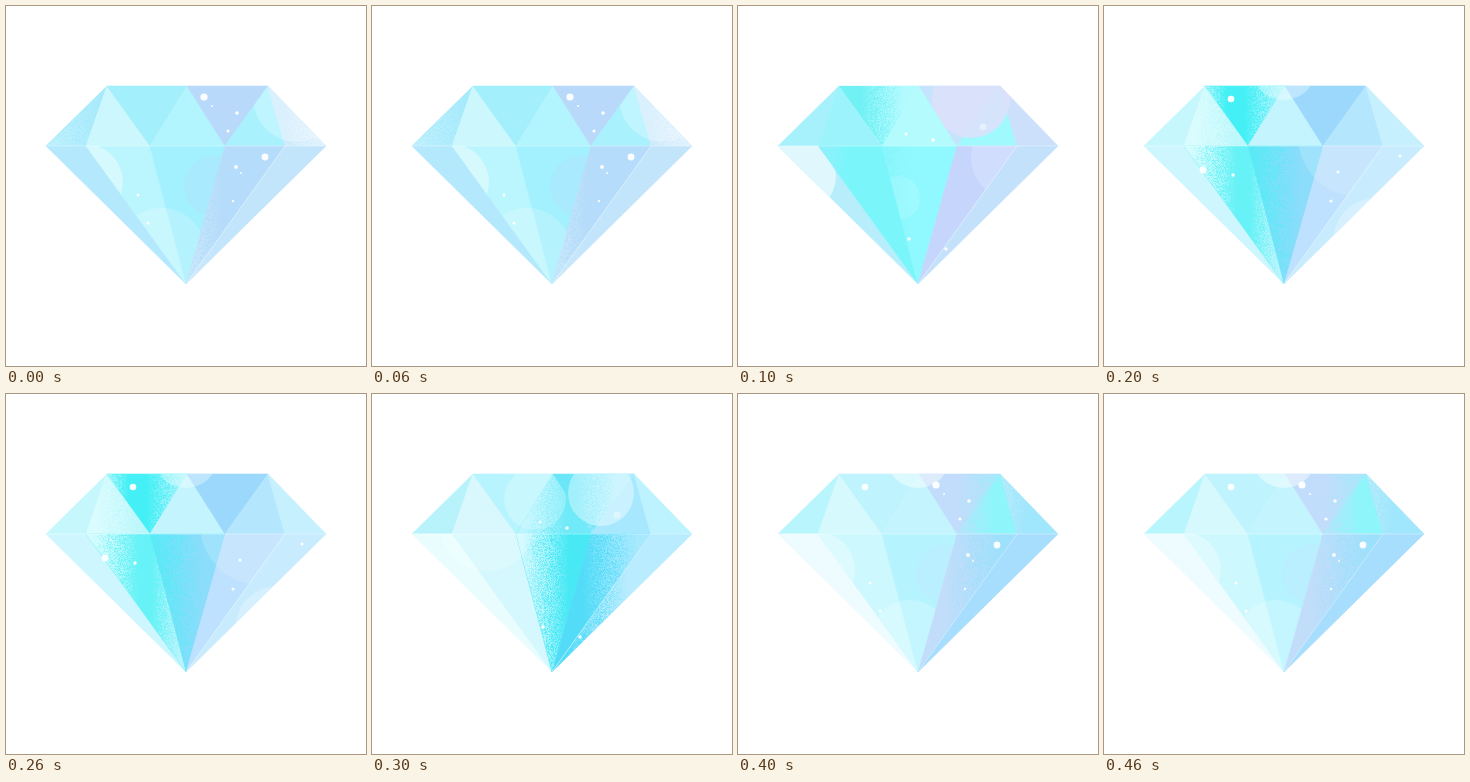
Write an HTML page with a canvas that moves like this. It is 360 by 360 pixels and loops after 500 ms.

```html
<!DOCTYPE html>
<html lang="en">
<head>
<meta charset="utf-8">
<title>Diamond</title>
<style>
  html, body { margin: 0; width: 100%; height: 100%; overflow: hidden; background: #fff; }
  canvas { display: block; width: 360px; height: 360px; }
</style>
</head>
<body>
<canvas id="stage" width="360" height="360"></canvas>
<script>
const SIZE = 360, STEP = 100;
const ctx = document.getElementById('stage').getContext('2d');

// Corners: crown row, girdle row and tip
const [t0, t1, t2] = [101, 181, 262].map(x => [x, 80]);
const [g0, g1, g2, g3, g4, g5] = [40, 80, 144, 219, 279, 320].map(x => [x, 140]);
const tip = [180, 278];
const outline = [t0, t2, g5, tip, g0];

// A-G form the crown, H-L the pavilion, both left to right
const facets = {
  A: [g0, t0, g1], B: [t0, g1, g2], C: [t0, t1, g2], D: [t1, g2, g3],
  E: [t1, t2, g3], F: [t2, g3, g4], G: [t2, g4, g5],
  H: [g0, g1, tip], I: [g1, g2, tip], J: [g2, g3, tip],
  K: [g3, g4, tip], L: [g4, g5, tip]
};
const names = Object.keys(facets);

// Sparkles: x, y, radius
const sparkA = [[198, 91, 3.6], [231, 107, 1.8], [222, 125, 1.6], [206, 100, 1], [259, 151, 3.4],
  [230, 161, 1.9], [235, 167, 1], [227, 195, 1.2], [132, 189, 1.5], [142, 217, 1.5]];
const sparkB = [[195, 134, 1.8], [168, 128, 1.5], [171, 233, 1.7], [208, 243, 1.7]];
const sparkC = [[127, 93, 3.3], [99, 164, 3.5], [129, 169, 1.7], [234, 166, 1.5],
  [227, 195, 1.5], [296, 150, 1.5]];
const glint = ['EF', 245, 121, 3.6, '#ffffff60'];

// bubbles: facets, x, y, radius, colour
// spray: facets, x where it begins, x where it is solid, colour
const poses = [
  {
    fill: '#a6eafc #ccf7fd #a3effb #b2f5fe #b9d9fb #a8f1fd #cdeafc #b4e8fd #bbf5fd #a3f0fe #b5dcfa #c3e5fc',
    bubbles: [['I', 79, 176, 38, '#ffffff66'], ['IJ', 155, 247, 45, '#ffffff30'],
      ['J', 208, 180, 30, '#b5dcfa50'], ['FG', 291, 92, 44, '#ffffff40']],
    spray: [['G', 275, 330, '#e8f5fd'], ['A', 95, 30, '#c2f1fd'], ['KL', 215, 165, '#cdebfc']],
    sparks: sparkA
  },
  {
    fill: '#a6f1fb #9cf3fb #b2fafe #b4fbfe #c5e3fd #9ff9fd #cce0fb #b8eefc #7af6fb #90f9ff #c5d5fb #c4e1fc',
    bubbles: [['EFG', 233, 93, 39, '#dee2fbdd'], ['K', 275, 152, 42, '#ffffff30'],
      ['J', 160, 192, 22, '#ffffff20'], ['H', 60, 170, 38, '#ffffff90'], glint],
    spray: [['C', 165, 122, '#72f1f5'], ['I', 110, 80, '#94effb'], ['J', 175, 130, '#85f4fa']],
    sparks: sparkB
  },
  {
    fill: '#c5f7fd #dafcfe #44f0f5 #c4f4fe #9bd8fc #b4e7fe #c6f0fe #cdf6fe #66f2f6 #58eaf6 #bde1fe #c8ebfe',
    bubbles: [['CDE', 180, 62, 32, '#ffffff55'], ['JK', 255, 130, 61, '#ffffff28'],
      ['KL', 272, 235, 43, '#ffffff40']],
    spray: [['B', 90, 140, '#b9f7fb'], ['C', 122, 98, '#b0f6fb'], ['C', 140, 178, '#b0f3fd'],
      ['I', 132, 85, '#d8fcfe'], ['I', 145, 174, '#b8f5fc'], ['J', 146, 196, '#8cdcfb']],
    sparks: sparkC
  },
  {
    fill: '#b8f3fb #d8f8fe #b8f4fd #70eaf8 #6ae6f8 #a8e8fe #bdf3fe #e9fdff #d4f8fe #48e9f5 #52dcf8 #b8ecfe',
    bubbles: [['HIJ', 115, 130, 47, '#ffffff30'], ['DEF', 229, 99, 33, '#ffffff60'],
      ['CD', 163, 105, 31, '#ffffff38'], glint],
    spray: [['J', 196, 150, '#cdf8fe'], ['K', 210, 265, '#a8e9fe'], ['L', 255, 192, '#52dcf8'],
      ['D', 194, 150, '#bdf5fe'], ['E', 203, 245, '#b0effe']],
    sparks: sparkB
  },
  {
    fill: '#b8f5fc #d6f9fe #bff3fd #c4f5fe #c2ddfb #8ef5fb #a0e6fc #eefcff #ccf8fe #b5f4fe #c2ddfa #a7ddfd',
    bubbles: [['CDE', 180, 62, 32, '#ffffff70'], ['IJ', 172, 246, 40, '#ffffff30'],
      ['I', 79, 176, 38, '#ffffff55'], ['J', 208, 180, 30, '#c2ddfa40']],
    spray: [['F', 255, 215, '#bfe0fb'], ['E', 220, 268, '#9feafb'], ['K', 205, 265, '#9de0fb'],
      ['G', 290, 255, '#b8edfc']],
    sparks: [...sparkA, sparkC[0]]
  }
];

function seeded(seed) {
  return () => (seed = (seed * 16807) % 2147483647) / 2147483647;
}

function addPolygon(c, points) {
  points.forEach(([x, y], i) => i ? c.lineTo(x, y) : c.moveTo(x, y));
  c.closePath();
}

function clipTo(c, shapes, draw) {
  c.save();
  c.beginPath();
  shapes.forEach(points => addPolygon(c, points));
  c.clip();
  draw();
  c.restore();
}

function disc(c, x, y, r, colour) {
  c.fillStyle = colour;
  c.beginPath();
  c.arc(x, y, r, 0, Math.PI * 2);
  c.fill();
}

const pick = letters => [...letters].map(n => facets[n]);

// A soft ramp across x, grainiest halfway along
function drawSpray(c, [letters, from, to, colour], random) {
  const shapes = pick(letters);
  const xs = shapes.flat().map(p => p[0]);
  const ys = shapes.flat().map(p => p[1]);
  clipTo(c, shapes, () => {
    c.fillStyle = colour;
    for (let y = Math.min(...ys); y < Math.max(...ys); y++) {
      for (let x = Math.min(...xs); x < Math.max(...xs); x++) {
        const ramp = Math.min(1, Math.max(0, (x - from) / (to - from)));
        const grain = (random() - 0.5) * 4 * ramp * (1 - ramp);
        c.globalAlpha = Math.min(1, Math.max(0, ramp + grain * 0.8));
        c.fillRect(x, y, 1, 1);
      }
    }
  });
}

function drawPose(pose, index) {
  const layer = document.createElement('canvas');
  layer.width = layer.height = SIZE;
  const c = layer.getContext('2d');
  const random = seeded(4211 + index * 97);
  c.fillStyle = '#fff';
  c.fillRect(0, 0, SIZE, SIZE);

  pose.fill.split(' ').forEach((colour, i) => {
    c.beginPath();
    addPolygon(c, facets[names[i]]);
    c.fillStyle = c.strokeStyle = colour;
    c.lineWidth = 0.6;
    c.fill();
    c.stroke();
  });
  pose.spray.forEach(s => drawSpray(c, s, random));
  pose.bubbles.forEach(([letters, ...circle]) =>
    clipTo(c, pick(letters), () => disc(c, ...circle)));

  clipTo(c, [outline], () => {
    c.strokeStyle = '#ffffff70';
    c.lineWidth = 0.8;
    c.beginPath();
    c.moveTo(...g0);
    c.lineTo(...g5);
    c.moveTo(...g4);
    c.lineTo(...tip);
    c.stroke();
    pose.sparks.forEach(([x, y, r]) => disc(c, x, y, r, '#fffffff0'));
  });
  return layer;
}

const layers = poses.map(drawPose);
const start = performance.now();

function render(now) {
  const t = Math.max(0, now - start);
  ctx.drawImage(layers[Math.floor(t / STEP) % layers.length], 0, 0);
  requestAnimationFrame(render);
}
render(start);
</script>
</body>
</html>
```
